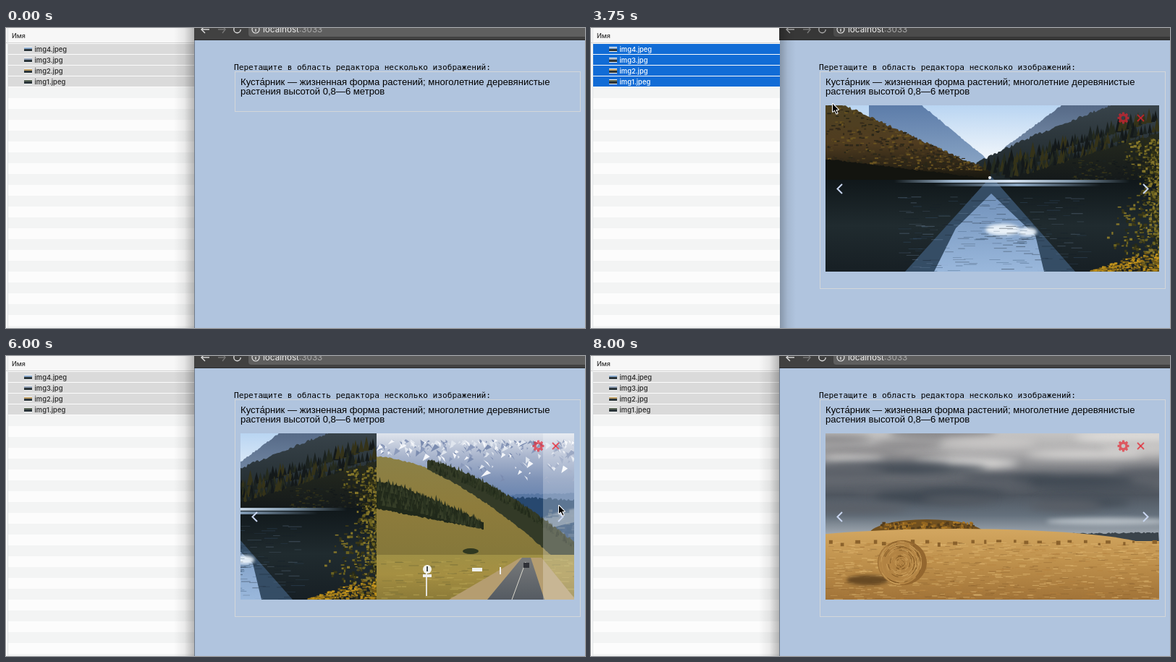
Animation of 800 by 415 pixels, one loop 8250 ms. Source, as an HTML page with a canvas:

```html
<!DOCTYPE html>
<html lang="ru">
<head>
<meta charset="utf-8">
<title>Редактор</title>
<style>
html, body { margin: 0; width: 100%; height: 100%; overflow: hidden; background: #b0c4de; }
canvas { display: block; }
</style>
</head>
<body>
<canvas id="stage" width="800" height="415"></canvas>
<script>
const stage = document.getElementById('stage').getContext('2d');
const LOOP = 8250, STEP = 250, PW = 461, PH = 230;
let g = stage;

// ---- drawing helpers ----
function rect(color, x, y, w, h) { g.fillStyle = color; g.fillRect(x, y, w, h); }
function path(...pts) {
  g.beginPath();
  for (let i = 0; i < pts.length; i += 2) g.lineTo(pts[i], pts[i + 1]);
}
function poly(color, ...pts) { path(...pts); g.closePath(); g.fillStyle = color; g.fill(); }
function line(color, width, ...pts) { path(...pts); g.strokeStyle = color; g.lineWidth = width; g.stroke(); }
function arc(color, width, x, y, r, from = 0, to = 7) {
  g.beginPath();
  g.arc(x, y, r, from, to);
  g.strokeStyle = color;
  g.lineWidth = width;
  g.stroke();
}
function oval(color, x, y, rx, ry = rx) {
  g.beginPath();
  g.ellipse(x, y, rx, ry, 0, 0, 7);
  g.fillStyle = color;
  g.fill();
}
function grad(x0, y0, x1, y1, ...colors) {
  const f = g.createLinearGradient(x0, y0, x1, y1);
  colors.forEach((c, i) => f.addColorStop(i / (colors.length - 1), c));
  return f;
}
const down = (y0, y1, ...colors) => grad(0, y0, 0, y1, ...colors);
const across = (x0, x1, ...colors) => grad(x0, 0, x1, 0, ...colors);
function text(s, x, y, font, color) { g.font = font; g.fillStyle = color; g.fillText(s, x, y); }
function chevron(color, x, y, w, h, width) { line(color, width, x - w, y - h, x, y, x - w, y + h); }

let seed = 7;
const rnd = (a = 0, b = 1) => {
  seed = (seed * 16807) % 2147483647;
  return a + (b - a) * seed / 2147483647;
};
const times = (n, f) => { for (let i = 0; i < n; i++) f(i / n); };
const pick = list => list[Math.floor(rnd(0, list.length))];
function soft(px, draw) { g.filter = `blur(${px}px)`; draw(); g.filter = 'none'; }

// Land below a bent, rough slope from (x0, y0) to (x1, y1)
function slope(color, x0, y0, x1, y1, base, bend = 1, rough = 1) {
  const pts = [x0, base];
  for (let x = x0; x <= x1; x += 2) {
    pts.push(x, y0 + (y1 - y0) * ((x - x0) / (x1 - x0)) ** bend + rnd(-rough, rough));
  }
  poly(color, ...pts, x1, base);
}
function firs(n, x0, y0, x1, y1, h, colors, bend = 1) {
  times(n, k => {
    const x = x0 + (x1 - x0) * k + rnd(-2, 2), y = y0 + (y1 - y0) * k ** bend, s = h * rnd(.5, 1.1);
    poly(pick(colors), x - s * .22, y, x, y - s, x + s * .22, y);
  });
}
function specks(n, x, y, w, h, size, colors, flat = .4) {
  times(n, () => rect(pick(colors), x + rnd(0, w), y + rnd(0, h), rnd(.4, 1) * size, rnd(.4, 1) * size * flat));
}

// ---- the three photos ----
function lake() {
  rect(down(0, 80, '#b9d5f2', '#f6f9fc'), 0, 0, PW, PH);
  slope(down(0, 85, '#5c7ca9', '#8aa5c5'), 60, -60, 228, 78, 104);
  slope(down(0, 85, '#566a87', '#8399b5'), 216, 82, PW, -100, 104);
  slope(down(0, 100, '#38434a', '#1d2629'), 205, 84, PW, -25, 104, .85, 2);
  const woods = ['#1b2220', '#252b1f', '#14191a', '#353319'];
  times(5, k => firs(50, 220 + k * 50, 92 + k * 14, PW, 20 + k * 75, 20, woods));
  slope(down(20, 104, '#2c3020', '#14191a'), 255, 101, PW, 38, 108, 1, 2);
  specks(200, 340, 75, 120, 30, 5, woods);
  slope(down(0, 104, '#4e4222', '#503c20', '#15150f'), -40, -30, 228, 92, 104, 1, 2);
  times(500, k => {
    const x = k * 215;
    rect(pick(['#6a5420', '#33291a', '#292618', '#4f3e1e']), x, rnd(x * .44 - 10, 88), rnd(2, 6), rnd(1, 3));
  });
  slope('#13140f', 0, 74, 230, 102, 105);
  // water mirrors the valley
  rect(down(103, PH, '#10171a', '#202b2f', '#171f24'), 0, 103, PW, PH);
  poly('#354d65', 229, 98, 345, PH, 110, PH);
  poly(down(125, PH, '#7292bb', '#9ab8dc'), 229, 122, 290, 180, 302, PH, 150, PH, 180, 170);
  soft(2, () => { oval('#e9f1f8', 245, 172, 24, 8); oval('#e9f1f8', 279, 175, 13, 6); });
  specks(260, 100, 125, 250, 105, 20, ['#36506b66', '#8faaca44', '#14202866'], .06);
  rect(across(95, 420, '#9eb7d000', '#9eb7d0', '#d4e1ef', '#8299ad', '#8299ad00'), 95, 103, 325, 4);
  rect(across(150, 380, '#8ba6c200', '#8ba6c2', '#8ba6c200'), 150, 108, 230, 4);
  oval('#fff', 227, 100, 2);
  // bush, denser towards the edge
  times(700, () => {
    const y = rnd(45, PH), x = PW - rnd() * rnd() * (60 + 25 * Math.sin(y / 22));
    rect(pick(['#6b6220', '#3b3817', '#85762a', '#282b16']), x, y, rnd(2, 5), rnd(1, 4));
  });
  times(260, () => {
    const x = rnd(365, PW);
    rect(pick(['#c4951d', '#6d5719', '#a37c1b']), x, PH - rnd(0, (x - 360) * .35), rnd(2, 6), rnd(1, 3));
  });
}

function valley() {
  rect(down(0, 95, '#dfe4ec', '#a9b5cd', '#7f93b7', '#6482ae'), 0, 0, PW, PH);
  // snow facets thin out downhill
  times(420, () => {
    const x = rnd(0, PW), y = 8 + rnd() * rnd() * 65, s = rnd(3, 11), lean = rnd(-1, 1) * s;
    poly(pick(['#f4f6fa', '#dfe5ee', '#7b8cb0', '#8b9abb']), x, y, x + s * .6, y + s * .4, x + lean, y + s);
  });
  slope('#5877a3', 140, 86, PW, 78, 170);
  slope('#27486f', 165, 88, PW, 98, 175, 1, 2);
  soft(1, () => oval('#71859a', 310, 165, 120, 64));
  oval('#2d4d74', 310, 178, 115, 58);
  specks(150, 220, 105, 230, 55, 12, ['#8090a044', '#8f9a9955', '#23446a88']);
  slope('#8b8b66', 370, 176, PW, 148, 180);
  // golden hill with two strips of wood
  const gold = down(30, 175, '#8b8147', '#8e7c3c', '#84773a'), wood = ['#232b1b', '#353d27', '#2b3421'];
  slope(gold, 0, 32, 294, 172, 175, 1.5);
  slope('#333a27', 70, 37, 295, 168, 172, 1.4, 2);
  times(4, k => firs(70, 75, 44 + k * 16, 290, 172, 9, wood, 1.4));
  slope(gold, 20, 36, 245, 172, 175, 1.5);
  slope('#20281a', 0, 66, 148, 124, 138, 1.3, 2);
  times(5, k => firs(45, 0, 72 + k * 34, 145, 128 + k * 8, 12, wood, 1.3));
  slope(gold, 0, 104, 165, 136, 175);
  // field and road
  rect(down(160, PH, '#9d9046', '#a58f42', '#8b7a38'), 0, 168, PW, 62);
  firs(90, 285, 173, PW, 178, 13, wood);
  oval('#303820', 130, 163, 11, 4);
  specks(330, 0, 172, PW, 58, 15, ['#c2ad5a77', '#6f6a3777', '#b6a25266'], .12);
  poly('#b59d70', 199, 172, 228, 172, 275, PH, 100, PH);
  poly(down(172, PH, '#787a7b', '#555b62'), 201, 172, 213, 172, 232, PH, 153, PH);
  line('#d9d7cc', 1, 206, 178, 187, PH);
  rect('#303238', 203, 179, 8, 7);
  rect('#eef0ee', 132, 186, 14, 5);
  rect('#e3e2da', 68, 193, 2, 32);
  oval('#f2f2ec', 70, 188, 6);
  rect('#454b4c', 69, 184, 2, 7);
  rect('#eee', 64, 195, 12, 4);
  rect('#eee', 170, 185, 2, 10);
}

function hay() {
  rect(down(0, 142, '#c4c3c2', '#aaa9aa', '#707379', '#4f565f', '#65717d', '#a5adb5'), 0, 0, PW, PH);
  // clouds darken towards the middle of the sky
  soft(6, () => times(26, k => oval(
    pick(k < .4 ? ['#dddbd9', '#8b8a8c', '#c9c7c6'] : ['#454d57', '#5b6068', '#3f4852']),
    rnd(0, PW), k * 108, rnd(40, 95), rnd(4, 11))));
  soft(3, () => oval('#b5bdc4', 390, 122, 85, 5));
  slope('#3b444b', 260, 140, PW, 137, 152);
  slope('#4a4738', 0, 143, 70, 137, 152);
  oval('#71501f', 140, 140, 80, 21);
  specks(140, 75, 122, 130, 10, 5, ['#93651f', '#553d1b', '#ab7928'], .8);
  const straw = down(132, PH, '#d3a760', '#bd8f4b', '#a17338');
  oval(straw, 180, 160, 270, 28);
  rect(straw, 0, 149, PW, PH);
  specks(900, 0, 150, PW, 80, 13, ['#e3bd7688', '#80582966', '#b4803d88', '#efcb8466'], .1);
  times(24, k => rect('#8b622c', k * PW + rnd(0, 12), rnd(147, 152), rnd(3, 7), rnd(3, 6)));
  soft(2, () => oval('#553b1ccc', 58, 203, 29, 7));
  oval('#94672f', 106, 179, 34, 31);
  oval('#b28343', 103, 179, 30);
  times(170, () => {
    const a = rnd(0, 6.28);
    arc(pick(['#d0a561', '#77501f', '#bc8c49']), .8, 104, 179, rnd(3, 30), a, a + .5);
  });
}

const photos = [lake, valley, hay].map(draw => {
  const c = document.createElement('canvas');
  c.width = PW; c.height = PH;
  g = c.getContext('2d');
  draw();
  return c;
});
g = stage;

// ---- motion ----
// The pointer takes one second to reach each stop: [departure, x, y]
const stops = [[1000, 29, 27], [2250, 334, 105], [3750, 764, 207]];
function pointerAt(t) {
  let x = 150, y = 140;
  for (const [from, toX, toY] of stops) {
    const k = Math.min(1, Math.max(0, (t - from) / 1000));
    x += (toX - x) * k;
    y += (toY - y) * k;
  }
  return [x, y];
}
// CSS "ease" curve: cubic-bezier(.25, .1, .25, 1)
function ease(x) {
  if (x <= 0 || x >= 1) return x <= 0 ? 0 : 1;
  let lo = 0, hi = 1, s;
  const bez = (a, b) => 3 * a * s * (1 - s) ** 2 + 3 * b * s * s * (1 - s) + s ** 3;
  times(30, () => { s = (lo + hi) / 2; bez(.25, .25) < x ? lo = s : hi = s; });
  return bez(.1, 1);
}

// ---- scene parts ----
function fileList(active) {
  rect('#fcfcfc', 0, 0, 261, 415);
  for (let y = 82; y < 415; y += 30) rect('#f3f4f4', 3, y, 258, 15);
  rect('#f7f7f7', 0, 0, 261, 20);
  rect('#d2d2d2', 0, 20, 261, 1);
  rect('#dfe3e5', 2, 0, 1, 415);
  text('Имя', 8, 14, '500 9px Inter, sans-serif', '#333');
  ['img4.jpeg', 'img3.jpg', 'img2.jpg', 'img1.jpeg'].forEach((name, i) => {
    const y = 22 + i * 15;
    rect(active ? '#116cd6' : '#dadada', 3, y, 258, 14);
    rect('#f4f5f6', 25, y + 4, 11, 7);
    rect(['#8aa9cc', '#91a0b5', '#bd9c62', '#596556'][i], 25, y + 5, 11, 3);
    rect('#2b353a', 25, y + 7, 11, 3);
    text(name, 39.5, y + 11, '500 9.4px Inter, sans-serif', active ? '#fff' : '#262626');
  });
}

function browser(front) {
  if (front) rect(across(232, 261, '#0000', '#00000012', '#00000048'), 232, 0, 29, 415);
  rect('#b0c4de', 261, 0, 539, 415);
  rect(front ? '#414141' : '#373737', 260, 0, 540, 16);
  g.beginPath();
  g.roundRect(335, -12, 480, 24, 4);
  g.fillStyle = front ? '#5f5f5f' : '#4b4b4b';
  g.fill();
  rect('#2b2d30', 260, 16, 540, 1);
  const ink = front ? '#ddd' : '#aaa';
  chevron(ink, 270, 2, -5, 5, 1.4);
  line(ink, 1.4, 270, 2, 281, 2);
  chevron('#777', 303, 2, 4, 5, 1.4);
  line('#777', 1.4, 293, 2, 303, 2);
  arc(ink, 1.4, 319.5, 2, 4.7, 0, 5.4);
  arc('#eee', 1.1, 345, 2, 5);
  rect('#eee', 344.4, 1, 1.2, 4);
  text('localhost', 355, 6, '11.7px Inter, sans-serif', '#eee');
  text(':3033', 355 + g.measureText('localhost').width, 6, g.font, '#aaa');
  if (front) rect('#6d7989', 260, 17, 1, 398);
  else rect(across(261, 283, '#0000003c', '#00000010', '#0000'), 261, 0, 22, 415);
}

function gear(x, y) {
  g.beginPath();
  times(64, k => {
    const a = k * 2 * Math.PI, r = Math.cos(a * 8) > -.2 ? 8 : 6;
    g.lineTo(x + r * Math.cos(a), y + r * Math.sin(a));
  });
  g.closePath();
  g.moveTo(x + 2.8, y);
  g.arc(x, y, 2.8, 0, 2 * Math.PI);
  g.fillStyle = '#e6202ca8';
  g.fill('evenodd');
}

function slider(t) {
  const shift = PW * (ease((t - 5709) / 850) + ease((t - 6705) / 850));
  g.save();
  g.beginPath();
  g.rect(324, 107, PW, PH);
  g.clip();
  photos.forEach((p, i) => g.drawImage(p, Math.round(324 + i * PW - shift), 107));
  if (t >= 5500 && t < 8000) rect('#ffffff40', 742, 107, 43, PH);
  g.restore();
  chevron('#c8d5ef', 340.5, 222.5, -6.5, 6.5, 2);
  chevron('#c8d5ef', 769.5, 222.5, 6.5, 6.5, 2);
  gear(735.5, 124.5);
  line('#e6202cb8', 1.8, 755, 120, 764, 129);
  line('#e6202cb8', 1.8, 764, 120, 755, 129);
}

function editor(t) {
  const open = t >= 3500;
  text('Перетащите в область редактора несколько изображений:', 315, 58,
    '11.13px "DejaVu Sans Mono", monospace', '#000');
  g.strokeStyle = '#d3d6d9';
  g.lineWidth = 1;
  g.strokeRect(316.5, 60.5, 477, open ? 300 : 55);
  const font = '13.1px "Liberation Sans", Arial, sans-serif';
  text('Куста́рник — жизненная форма растений; многолетние деревянистые', 324, 79, font, '#000');
  text('растения высотой 0,8—6 метров', 324, 92, font, '#000');
  if (open) slider(t);
}

function arrow(x, y) {
  g.save();
  g.translate(x, y);
  g.lineJoin = 'round';
  path(0, 0, 0, 10.8, 2.7, 8.4, 5.2, 13.5, 6.5, 13, 4.3, 8, 7.8, 8);
  g.closePath();
  g.strokeStyle = '#fff';
  g.lineWidth = 2;
  g.stroke();
  g.fillStyle = '#000';
  g.fill();
  g.restore();
}

function paint(now) {
  const t = Math.floor(now % LOOP / STEP) * STEP;
  const active = t >= 1750 && t < 5500;
  fileList(active);
  browser(!active);
  editor(t);
  if (t >= 1500 && t < 8000) arrow(...pointerAt(t));
}

const start = performance.now();
function tick() {
  paint(performance.now() - start);
  requestAnimationFrame(tick);
}
tick();
</script>
</body>
</html>
```
